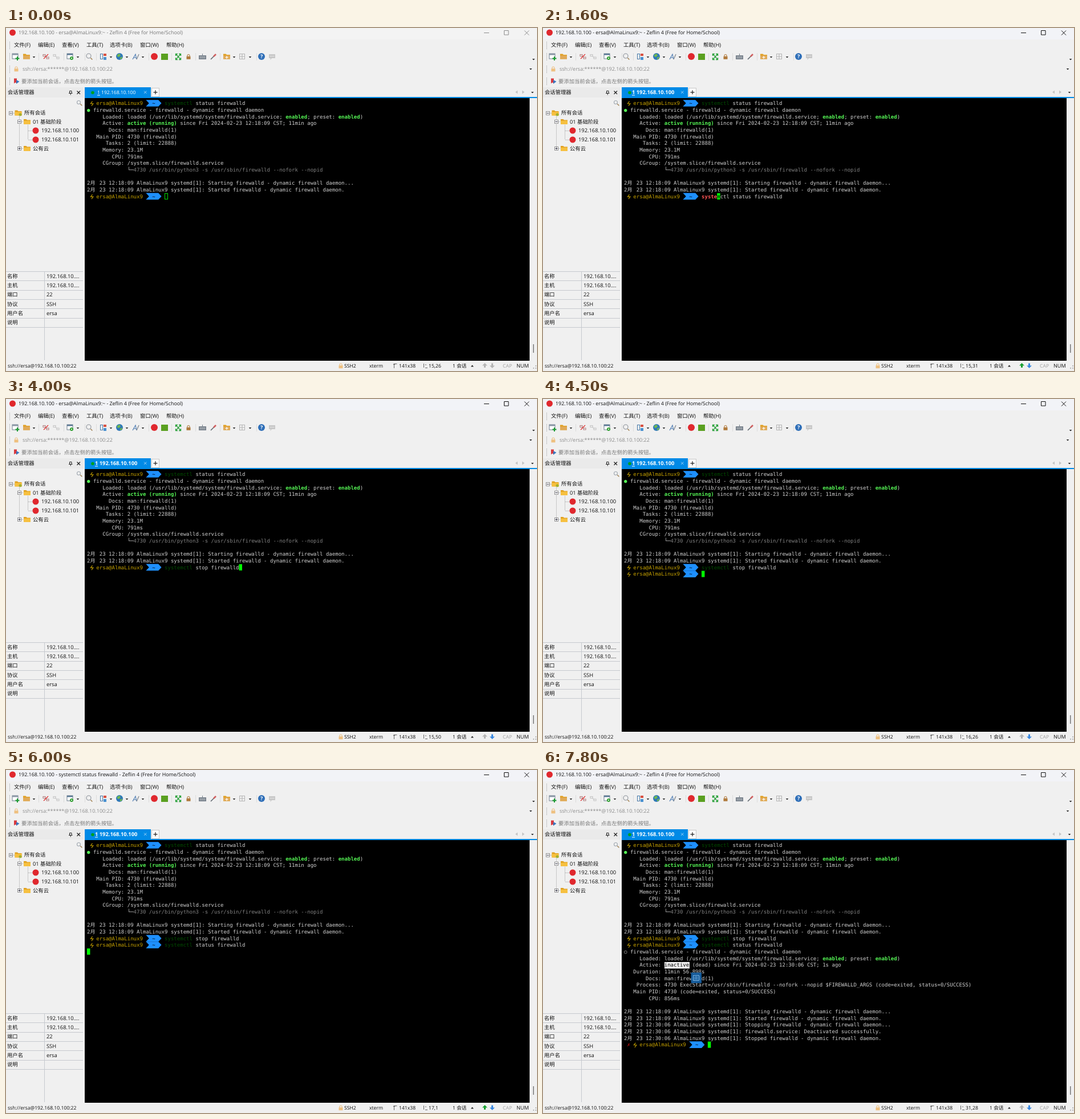
Animation of 931 by 602 pixels, one loop 8000 ms. Source, as an HTML page with a canvas:

```html
<!DOCTYPE html>
<html lang="zh-CN">
<head>
<meta charset="utf-8">
<title>Terminal session</title>
<style>
  html, body { margin: 0; width: 931px; height: 602px; overflow: hidden; background: #f0f0f0; }
  canvas { display: block; }
</style>
</head>
<body>
<canvas id="stage" width="931" height="602"></canvas>
<script>
const ctx = document.getElementById('stage').getContext('2d');
ctx.textRendering = 'geometricPrecision';

const LOOP = 8000;
const USER = 'ersa', HOST = '192.168.10.100', APP = 'Zeflin 4';
const CELL = 5.44, ROW = 11.67, LEFT = 142, TOP = 126.2;
const INK = { w: '#d0d0d0', g: '#55f555', y: '#c4a000', d: '#004a00', x: '#808080', r: '#ff5555', e: '#c01010', k: '#000' };
const BOLD = 'gre';

// ---- drawing helpers ----
const uiFont = (size, weight = '') =>
  `${weight} ${size}px "Open Sans", "Noto Sans CJK SC", "Noto Sans CJK", sans-serif`;

function box(x, y, w, h, color) {
  ctx.fillStyle = color;
  ctx.fillRect(x, y, w, h);
}
function frame(x, y, w, h, color, width = 1) {
  ctx.strokeStyle = color;
  ctx.lineWidth = width;
  ctx.strokeRect(x, y, w, h);
}
function disc(x, y, r, color) {
  ctx.fillStyle = color;
  ctx.beginPath();
  ctx.arc(x, y, r, 0, 7);
  ctx.fill();
}
function fill(d, color) {
  ctx.fillStyle = color;
  ctx.fill(new Path2D(d));
}
function stroke(d, color, width = 1) {
  ctx.strokeStyle = color;
  ctx.lineWidth = width;
  ctx.stroke(new Path2D(d));
}
function label(s, x, y, color = '#111', size = 9.33, weight) {
  ctx.font = uiFont(size, weight);
  ctx.fillStyle = color;
  ctx.fillText(s, x, y + 3.3);
}
const dropdown = (x, y = 51) => fill(`M${x - 2.3} ${y - 1}h4.6l-2.3 2.6z`, '#222');
function dotted(d, color) {
  ctx.setLineDash([1, 1]);
  stroke(d, color);
  ctx.setLineDash([]);
}

// ---- icons ----
function folder(x, y, color = '#f6c040') {
  fill(`M${x - 6} ${y - 4.5}h4.5l1.5 1.5h6v7.5h-12z`, '#e0a020');
  box(x - 6, y - 1.8, 12, 6.3, color);
}
function lock(x, y, color) {
  stroke(`M${x - 2} ${y}v-2a2 2 0 0 1 4 0v2`, color, 1.1);
  box(x - 3.5, y - .7, 7, 5, color);
}
function lens(x, y, r, color) {
  ctx.beginPath();
  ctx.arc(x - 1, y - 1, r, 0, 7);
  ctx.strokeStyle = color;
  ctx.lineWidth = 1.1;
  ctx.stroke();
  stroke(`M${x + r * .6} ${y + r * .6}l3 3`, '#a08050', 1.4);
}
function chain(x, color) {
  stroke(`M${x - 5} 46.5h4v3h-4zM${x + 1} 51h4v3h-4zM${x - 2} 49l4 3`, color, 1.1);
}
function windowIcon(x, y, bar) {
  box(x - 5, y - 5, 10, 9, '#fff');
  frame(x - 5, y - 5, 10, 9, '#6f7f8f');
  box(x - 5, y - 5, 10, 2.5, bar);
}

function toolbar() {
  for (const x of [57, 101, 138, 158, 250, 290, 332, 375, 439]) box(x, 44, 1, 13, '#dcdcdc');
  windowIcon(16, 50, '#8a97a5');
  stroke('M20 50v7M16.5 53.5h7', '#1a9a30', 2);
  folder(36, 50, '#e0aa58');
  chain(70, '#b08080');
  stroke('M66 54l8-8', '#e03030', 1.2);
  chain(88, '#c4c4c4');
  windowIcon(112, 50, '#5a7894');
  disc(115, 53, 3, '#30a030');
  disc(115, 53, 1.1, '#fff');
  lens(146, 50, 4, '#8a9098');
  frame(165.5, 45.5, 4, 9, '#4878a8');
  box(171, 45, 5, 4, '#d85040');
  box(171, 51, 5, 5, '#4890d0');
  disc(199, 50, 6, '#2f78b8');
  fill('M195 47l4-2 2 3-3 3-3-1zM200 52l4-2-1 4-3 1z', '#70b850');
  stroke('M222 55l5-9 2 9M224 52h4', '#4878b0', 1.1);
  stroke('M229 55l4-9', '#808890', 1.3);
  disc(260, 50, 6, '#e0282e');
  box(272, 45, 12, 11, '#5aa020');
  stroke('M297.5 49v-3.5h3.5M303 45.5h3.5v3.5M306.5 52v3.5h-3.5M301 55.5h-3.5v-3.5M298 46l8 9M306 46l-8 9', '#28a038', 1.3);
  lock(320, 50.5, '#b07a3c');
  box(338, 48, 13, 7, '#78828c');
  dotted('M340 50.5h9M340 52.5h9', '#eee');
  stroke('M344.5 48v-3', '#78828c');
  stroke('M359 55l6-6', '#60686f', 1.6);
  stroke('M364 50l4-4', '#d06060', 2.6);
  folder(387, 50, '#e0aa58');
  stroke('M387 49v5M384.5 51.5h5', '#fff', 1.2);
  frame(409.5, 45.5, 9, 9, '#b4b4b4');
  stroke('M414 45.5v9M409.5 50h9', '#b4b4b4');
  disc(448, 50, 6, '#2f6fb8');
  label('?', 446, 50, '#fff', 9, 'bold');
  fill('M461 46h11v7h-6l-2.5 3v-3h-2.5z', '#c8c8c8');
  dotted('M463 49.5h7', '#fff');
  for (const x of [49, 126, 184, 212, 240, 400, 428]) dropdown(x);
  dropdown(925, 55);
}

function titleBar(active, title) {
  const color = active ? '#111' : '#8c8c8c';
  box(0, 0, 931, 20, active ? '#f2f3f7' : '#f3f3f3');
  disc(11.5, 8, 5.5, '#e0282e');
  label(`${HOST} - ${title} - ${APP} (Free for Home/School)`, 22, 8, active ? '#111' : '#777', 8.9);
  stroke('M838 8.5h9M873.5 4.5h7.5v7.5h-7.5zM909 4.5l8 8M917 4.5l-8 8', color);
}

function menus() {
  const items = { '文件(F)': 14, '编辑(E)': 56, '查看(V)': 98, '工具(T)': 141, '选项卡(B)': 182, '窗口(W)': 235, '帮助(H)': 281 };
  for (const name in items) label(name, items[name], 30);
  for (const y of [24, 44, 66, 87]) dotted(`M6.5 ${y}v13`, '#a0a0a0');
  toolbar();
  lock(18, 72, '#eec080');
  label(`ssh://${USER}:******@${HOST}:22`, 29, 72, '#8c8c8c', 9);
  dropdown(920, 72);
  fill('M14 88.5h5v9l-2.5-2-2.5 2z', '#d83a40');
  fill('M18 91l5.5 3-5.5 4z', '#3a78c0');
  label('要添加当前会话，点击左侧的箭头按钮。', 27, 94, '#777');
}

function sidebar() {
  box(0, 104, 136, 18, '#eaeaea');
  label('会话管理器', 3, 113);
  stroke('M111.5 110.5h3.5v4h-3.5zM110 114.5h6.5M113.2 114.5v3', '#222');
  stroke('M124.5 110.5l5.5 5.5M130 110.5l-5.5 5.5', '#222', 1.2);
  lens(128.5, 131.5, 3, '#a0a8b0');

  dotted('M8.5 153v0M12 149.5h4M23.5 153v56M27 164.5h4M38.5 170v26M39 180.5h8M39 196.5h8M27 211.5h4', '#a0a0a0');
  for (const [x, y, closed] of [[8.5, 149.5], [23.5, 164.5], [23.5, 211.5, true]]) {
    box(x - 3, y - 3, 6, 6, '#fff');
    frame(x - 3, y - 3, 6, 6, '#909090');
    stroke(`M${x - 2} ${y}h4` + (closed ? `M${x} ${y - 2}v4` : ''), '#334');
  }
  folder(21.5, 149);
  disc(25, 152, 2.5, '#a0b030');
  folder(37, 164.5);
  folder(37, 211.5);
  label('所有会话', 32, 149);
  label('01 基础阶段', 47, 164.5);
  label('公有云', 47, 211.5);
  for (const [y, end] of [[180, 100], [196, 101]]) {
    disc(52, y, 5.5, '#e0282e');
    label(HOST.slice(0, -3) + end, 62, y);
  }

  const details = [['名称', '192.168.10....'], ['主机', '192.168.10....'], ['端口', '22'], ['协议', 'SSH'], ['用户名', USER], ['说明', '']];
  details.forEach(([name, value], i) => {
    const y = 435.5 + i * 16.3;
    label(name, 2, y);
    label(value, 71, y);
  });
  for (let i = 0; i < 7; i++) box(0, Math.round(427 + i * 16.35), 135, 1, '#c6c9ce');
  box(67, 427, 1, 156, '#c6c9ce');
}

function tabs(active) {
  box(138, 104, 116, 18, '#008ae6');
  box(138, 121, 793, 2, '#008ae6');
  disc(152, 113.5, 2.8, '#00a020');
  const x = active ? 156 : 160;
  if (active) label('1 ' + HOST, x, 113, '#fff', 9.33, 'bold');
  else label('1 ' + HOST, x, 113, '#fff', 8.5);
  box(x, 117.5, 5, 1, '#fff');
  stroke('M242 110.5l4.5 4.5M246.5 110.5l-4.5 4.5', '#9cd0f5');
  box(255, 105, 13, 16, '#fafafa');
  frame(255.5, 105.5, 13, 15, '#c8c8c8');
  stroke('M258.5 112.8h7M262 109.3v7', '#222', 1.2);
  fill('M897 109.5v6l-4-3zM905 109.5v6l4-3z', '#c4c4c4');
  dropdown(923, 113);
}

function statusBar(row, col, sending, online) {
  box(0, 584, 931, 18, '#f0f0f0');
  const put = (s, x, color) => label(s, x, 593, color, 8.65);
  put(`ssh://${USER}@${HOST}:22`, 3);
  lock(587, 593, '#eec080');
  put('SSH2', 593);
  put('xterm', 637);
  stroke('M680.5 597v-7.500h5M679 591l1.500-2 1.500 2', '#666');
  put('141x38', 689);
  stroke('M732.500 589v7M735 591h2M735 596.500h4', '#666');
  put(`${row + 1},${col + 1}`, 741);
  put('1 会话', 783);
  fill('M815 594.500h5l-2.500-3z', '#222');
  fill('M839.500 588l4.500 4.500h-3v3.500h-3v-3.500h-3z', sending ? '#18a030' : '#b4b4b4');
  fill('M852.500 597l4.500-4.500h-3v-4h-3v4h-3z', online ? '#3a88e0' : '#b4b4b4');
  put('CAP', 871, '#a0a0a0');
  label('NUM', 895, 593, '#111', 9.1);
  for (const [x, y] of [[928, 592], [928, 596], [924, 596]]) box(x, y, 2, 2, '#b8b8b8');
}

// ---- terminal ----
const cellX = col => LEFT + col * CELL;
const cellY = row => TOP + row * ROW;

// Prints text on the character grid; <c> switches to colour c.
function print(row, col, text) {
  text.split(/<(\w)>/).reduce((ink, part, i) => {
    if (i % 2) return part;
    ctx.font = `${BOLD.includes(ink) ? 'bold ' : ''}9.04px "DejaVu Sans Mono", "Noto Sans CJK SC", "Noto Sans CJK", monospace`;
    ctx.fillStyle = INK[ink];
    for (const ch of part) {
      if (ch !== ' ') ctx.fillText(ch, cellX(col), cellY(row) + 9.1);
      col += /[\u2e80-\u9fff]/.test(ch) ? 2 : 1;
    }
    return ink;
  }, 'w');
}

function prompt(row, failed) {
  const shift = failed ? 2 : 0, y = cellY(row), h = ROW, x = cellX(19 + shift);
  if (failed) print(row, 1, '<e>✗');
  const bolt = cellX(1 + shift) + 3;
  stroke(`M${bolt + 1} ${y + 2.5}l-3 4h4.5l-3 4`, INK.y, 1.1);
  print(row, 3 + shift, `<y>${USER}@AlmaLinux9`);
  fill(`M${x} ${y}h21.800l5.400 ${h / 2}l-5.400 ${h / 2}h-21.800l5.400 -${h / 2}z`, '#1e90ff');
  print(row, 21 + shift, '<k>~');
}

const command = verb => `<d>systemctl<w> ${verb} firewalld`;
const printLines = (row, lines) => lines.forEach((line, i) => print(row + i, 0, line));
const log = (time, message) => `2月 23 ${time} AlmaLinux9 systemd[1]: ${message}`;

const HEAD = ' firewalld.service - firewalld - dynamic firewall daemon';
const LOADED = '     Loaded: loaded (/usr/lib/systemd/system/firewalld.service; <g>enabled<w>; preset: <g>enabled<w>)';
const DOCS = '       Docs: man:firewalld(1)';
const STARTED = [
  log('12:18:09', 'Starting firewalld - dynamic firewall daemon...'),
  log('12:18:09', 'Started firewalld - dynamic firewall daemon.')
];
const RUNNING = [
  '<g>●<w>' + HEAD,
  LOADED,
  '     Active: <g>active (running)<w> since Fri 2024-02-23 12:18:09 CST; 11min ago',
  DOCS,
  '   Main PID: 4730 (firewalld)',
  '      Tasks: 2 (limit: 22888)',
  '     Memory: 23.1M',
  '        CPU: 791ms',
  '     CGroup: /system.slice/firewalld.service',
  '             └─<x>4730 /usr/bin/python3 -s /usr/sbin/firewalld --nofork --nopid',
  '',
  ...STARTED
];
const STOPPED = [
  '○' + HEAD,
  LOADED,
  '     Active: inactive (dead) since Fri 2024-02-23 12:30:06 CST; 1s ago',
  '   Duration: 11min 56.898s',
  DOCS,
  '    Process: 4730 ExecStart=/usr/sbin/firewalld --nofork --nopid $FIREWALLD_ARGS (code=exited, status=0/SUCCESS)',
  '   Main PID: 4730 (code=exited, status=0/SUCCESS)',
  '        CPU: 856ms',
  '',
  ...STARTED,
  log('12:30:06', 'Stopping firewalld - dynamic firewall daemon...'),
  log('12:30:06', 'firewalld.service: Deactivated successfully.'),
  log('12:30:06', 'Stopped firewalld - dynamic firewall daemon.')
];

// [time, characters typed]
const TYPING = [
  [0, 0], [1000, 1], [1200, 2], [1300, 3], [1500, 4], [1600, 5], [1700, 6], [1800, 8], [2000, 9],
  [2100, 10], [2300, 11], [2400, 12], [2500, 13], [2700, 14], [2900, 15], [3800, 24]
];
const SENDING = [[1000, 3100], [3800, 4000], [4200, 4400], [4900, 5200], [6000, 6200]];
// [time, row, column] of the cursor after the first command is sent
const CURSOR = [[4200, 15, 0], [4500, 15, 25], [4900, 15, 49], [5000, 15, 51], [6000, 16, 0], [6100, 30, 0], [6200, 30, 27]];

const latest = (list, t) => list.filter(item => item[0] <= t).pop();
const within = (t, from, to) => t >= from && t < to;

function drawCursor(row, col, active, under) {
  const x = cellX(col), y = cellY(row);
  if (!active) return frame(x + .5, y + .8, 5, 10, '#00e000');
  box(x, y + .3, CELL, 11, '#00ff00');
  if (under) print(row, col, '<k>' + under);
}

function terminal(t, active, row, col) {
  const typed = latest(TYPING, t)[1];
  const line = `systemctl ${typed < 13 ? 'status' : 'stop'} firewalld`;
  box(138, 123, 780, 461, '#000');
  box(924, 555, 1.5, 15, '#777');
  prompt(0);
  print(0, 25, command('status'));
  printLines(1, RUNNING);
  prompt(14);
  if (typed >= 9) print(14, 25, '<d>systemctl<w>' + line.slice(9));
  else if (typed) print(14, 25, `<r>${line.slice(0, typed)}<w>${line.slice(typed)}`);
  if (t >= 4500) prompt(15);
  if (t >= 4900) print(15, 25, command(t < 5000 ? 'stop' : 'status'));
  if (t >= 6100) printLines(16, STOPPED);
  if (t >= 6200) prompt(30, true);
  drawCursor(row, col, active, t < 4200 && typed ? line[typed] : '');
  if (t >= 7600) {
    box(213, 337, 44, 11.5, '#f0f0f0');
    print(18, 13, '<k>inactive');
  }
  if (t >= 7800) {
    box(259.5, 355.5, 18.5, 18.5, 'rgba(24,104,176,.88)');
    stroke('M263.5 360.500h10v9h-10zM265.500 363.500h6M265.500 366.500h6', '#7fb4e0');
  }
}

function draw(t) {
  const active = t >= 200;
  const [, row, col] = t < 4200 ? [0, 14, 25 + latest(TYPING, t)[1]] : latest(CURSOR, t);
  const title = within(t, 4200, 4500) ? 'systemctl stop firewalld'
    : within(t, 6000, 6200) ? 'systemctl status firewalld' : `${USER}@AlmaLinux9:~`;
  box(0, 0, 931, 602, '#f0f0f0');
  titleBar(active, title);
  menus();
  sidebar();
  tabs(active);
  terminal(t, active, row, col);
  statusBar(row, col, SENDING.some(([from, to]) => within(t, from, to)), t >= 300);
}

// Everything changes on a 100 ms beat, so redraw once per beat.
let lastBeat = -1;
function tick() {
  const beat = Math.floor(performance.now() % LOOP / 100);
  if (beat !== lastBeat) draw((lastBeat = beat) * 100);
  requestAnimationFrame(tick);
}
tick();
</script>
</body>
</html>
```
